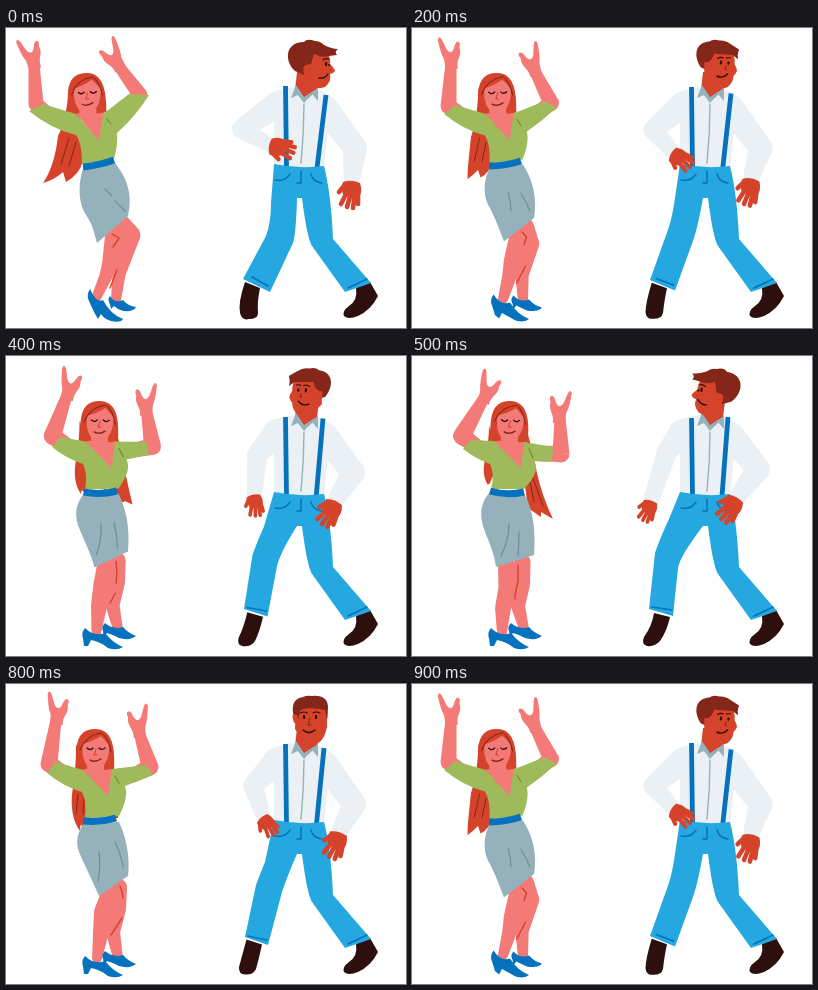
These frames come from a looping animation (400 by 300 pixels, 1 s). An HTML page:

```html
<!DOCTYPE html>
<html lang="en">
<head>
<meta charset="utf-8">
<title>Two dancers</title>
<style>
html, body { margin: 0; width: 100%; height: 100%; overflow: hidden; background: #fff; }
svg { display: block; width: 100%; height: 100%; }
</style>
</head>
<body>
<svg id="stage" viewBox="0 0 400 300"></svg>
<script>
const PINK = '#f47a78', RED = '#d5432a', MAROON = '#84261a', GREEN = '#9fba5a', OLIVE = '#738c3b',
  BLUE = '#0671bd', SKY = '#25a8e0', GREY = '#95b1bb', SLATE = '#708f9b',
  SHIRT = '#eaf0f3', DARK = '#2d0f0e';

const clamp = v => Math.min(1, Math.max(0, v));
const NUMBER = /-?\d+(\.\d+)?/g;

// Blends evenly spaced key shapes that share one structure; s runs from 0 to 1
function mix(s, ...keys) {
  const last = keys.length - 1, i = Math.min(Math.floor(s * last), last - 1), f = s * last - i;
  const next = keys[i + 1].match(NUMBER);
  let n = 0;
  return keys[i].replace(NUMBER, v => +(+v + (next[n++] - v) * f).toFixed(2));
}

const fill = (d, c) => `<path d="${d}" fill="${c}"/>`;
const line = (d, c, w = 1.4, cap = 'round') =>
  `<path d="${d}" fill="none" stroke="${c}" stroke-width="${w}" stroke-linecap="${cap}" stroke-linejoin="round"/>`;
const group = (s, tf) => `<g transform="${tf}">${s}</g>`;

// Tapered limb through joints "x,y,radius x,y,radius ..."
function limb(text, color) {
  const joints = text.split(' ').map(j => j.split(',').map(Number));
  let d = '';
  joints.forEach(([x, y, r], i) => {
    d += `M${x - r},${y}a${r},${r} 0 1 0 ${2 * r},0a${r},${r} 0 1 0 ${-2 * r},0Z`;
    if (!i) return;
    const [px, py, pr] = joints[i - 1], len = Math.hypot(x - px, y - py);
    const nx = (py - y) / len, ny = (x - px) / len;
    const at = (a, b, k) => `${(a + nx * k).toFixed(1)},${(b + ny * k).toFixed(1)}`;
    d += `M${at(px, py, pr)}L${at(x, y, r)}L${at(x, y, -r)}L${at(px, py, -pr)}Z`;
  });
  return fill(d, color);
}

const openHand = fill('M-6,5 L-7,-5 C-10,-11 -11,-19 -12,-25 Q-11,-30 -8,-25 L-4,-15 Q-1,-10 2,-13 C5,-17 4,-21 8,-22 Q11,-21 9,-16 C11,-9 7,-6 6,0 L6,5Z', PINK);

const looseHand =
  fill('M-8,-1 Q0,-4 9,0 Q12,9 8,14 L-7,13 Q-11,6 -8,-1Z', RED) +
  line('M-4,9 L-10,21 M0,10 L-4,24 M4,10 L2,25 M7,9 L7,21 M-7,3 L-12,9', RED, 4.6);

const herHead =
  fill('M-18,21 C-20,-1 -20,-21 0,-21 C18,-21 20,-2 19,19 L10,20 L-10,19Z', RED) +
  fill('M-8,12 L9,12 L9,24 L-8,24Z', PINK) +
  fill('M6,-14 C0,-10 -6,-8 -12,-6 C-14,7 -10,19 1,19 C11,18 15,5 14,-5 Q10,-10 6,-14Z', PINK) +
  line('M7,-17 Q-9,-15 -15,0 M8,-16 Q14,-10 16,2', MAROON, 1) +
  line('M-8,-2 Q-5,1 -2,-2 M4,-2 Q7,1 10,-2', DARK, 1.3) +
  line('M1,-1 L-1,5 L2,5', RED, 1) +
  line('M-5,10 Q0,13 6,9', MAROON, 1.4);

function woman(s) {
  const m = (...keys) => mix(s, ...keys);
  const hair = fill(m(
      'M63,60 C61,82 58,96 52,108 C50,126 45,144 37,155 Q48,152 57,144 L60,154 Q73,147 77,133 L74,90Z',
      'M70,60 C70,85 68,98 66,110 C65,122 66,136 74,147 Q74,143 75,140 L77,145 Q82,143 84,134 L84,90Z',
      'M77,70 C77,85 74,98 73,104 C71,112 71,122 76,129 Q76,128 77,128 L78,127 Q80,122 82,118 L84,90Z'), RED) +
    fill(m(
      'M94,75 Q96,95 96,105 Q98,115 98,125 L95,125 L94,122 L90,120 L88,100 L86,80Z',
      'M106,75 Q110,95 112,108 Q114,120 112,134 L108,134 L106,132 L102,130 L100,110 L98,80Z',
      'M115,75 Q122,100 125,117 Q130,140 141,163 L129,156 L129,161 L116,152 L111,115 L100,80Z'), RED) +
    line(m('M63,110 L55,136 M70,114 L63,138', 'M72,110 L70,130 M78,115 L77,130', 'M121,122 L131,150 M118,126 L122,146'), MAROON, 1);
  const arms =
    limb(m('28,36,5.5 30,76,7.5 42,85,6', '50,36,5.5 43,80,8.5 60,90,7', '72,42,5.5 50,80,9 66,91,7'), PINK) +
    limb(m('112,37,5.5 134,67,7.5 122,80,6', '133,48,5.5 144,83,8.5 126,92,7', '148,62,5.5 149,98,8.5 126,97,7'), PINK) +
    group(openHand, m('translate(28 36) rotate(-14)', 'translate(51 36) rotate(6)', 'translate(73 42) rotate(21)')) +
    group(openHand, m('translate(112 37) rotate(-32)', 'translate(133 48) rotate(-7)', 'translate(147 62) rotate(2)') + ' scale(-1 1)');
  const chest = m('M70,83 L97,83 L94,113Z', 'M82,83 L113,83 L109,112Z');
  const top = m(
    'M37,76 L70,86 L93,113 L97,86 L123,66 L143,67 Q130,88 111,105 Q112,117 108,131 L76,136 Q76,115 70,107 Q45,101 23,83Z',
    'M50,78 L77,86 L102,112 L106,85 L140,81 L147,91 Q132,97 119,102 Q123,113 113,132 L79,134 Q81,117 76,108 Q58,103 41,89Z',
    'M59,84 L82,85 L109,112 L112,86 L142,91 L139,106 Q130,106 122,105 Q129,115 112,133 L79,133 Q83,118 78,108 Q64,103 51,93Z');
  const legs =
    limb(m('112,195,11 125,207,9.5 113,246,6.5 110,272,5', '113,203,8 112,225,8 107,248,7 112,274,5', '110,206,8.5 110,228,8 106,250,7 112,273,5'), PINK) +
    limb(m('107,208,8 103,236,7 100,248,6.5 91,268,5', '107,208,11 98,228,10 95,248,8 91,274,5', '95,212,9 95,232,8.5 91,252,8 90,276,5'), PINK) +
    line(m('M106,206 L113,210 L107,219 M111,242 L104,260', 'M114,202 L116,208 L117,214 M116,234 L105,251', 'M106,209 L106,225 L103,240 M103,240 L103,243'), RED);
  const skirt = m(
    'M77,141 L109,135 C121,150 127,166 122,188 L91,215 C88,205 87,197 80,187 C72,175 72,155 77,141Z',
    'M78,139 L113,138 C121,155 124,175 122,192 L93,212 C88,200 78,180 73,168 C69,157 72,148 78,139Z',
    'M78,136 L112,137 C121,153 124,175 122,199 L84,211 C82,195 76,185 71,170 C67,155 70,145 78,136Z');
  const pleats = m(
    'M99,161 Q103,165 106,168 M109,173 Q114,178 119,183',
    'M93,168 Q95,182 92,197 M109,158 Q115,170 117,183',
    'M97,168 Q97,184 89,200 M107,176 Q107,188 106,200');
  const land = clamp(2 * s);
  const shoes = fill(mix(land,
      'M104,268 Q101,272 104,276 L105,281 L108,278 Q112,282 117,283 Q128,284 130,279 Q122,278 117,272 Q109,276 104,268Z',
      'M99,267 Q95,271 97,275 L98,281 L101,277 Q108,279 113,282 Q124,285 130,280 Q122,277 117,271 Q107,274 99,267Z'), BLUE) +
    fill(mix(land,
      'M84,261 Q80,267 83,273 L88,284 L92,291 L95,286 Q98,291 105,293 Q115,295 117,291 Q104,286 97,272 Q90,275 84,261Z',
      'M79,272 Q75,277 77,282 L78,290 L82,290 L85,284 Q95,286 102,292 Q111,295 117,291 Q107,287 99,277 Q88,281 79,272Z'), BLUE);

  return hair + arms + fill(chest, PINK) + line(chest + 'Z', PINK, 3) +
    group(herHead, `translate(${80.5 + 17 * s} 66) rotate(${5 * s - 3})`) +
    fill(top, GREEN) + line(m('M101,91 L105,96', 'M117,93 L121,102'), OLIVE, 1.2) +
    legs + fill(skirt, GREY) + line(pleats, SLATE, 1.3) +
    line(m('M77,139 Q94,137 108,132', 'M78,135 Q95,140 112,136'), BLUE, 7, 'butt') + shoes;
}

// Turns from profile to front, then mirrored back to profile
function hisHead(s) {
  const m = (...keys) => mix(2 * Math.min(s, 1 - s), ...keys);
  const head = fill(m(
      'M297,22 L321,22 Q325,32 324,36 Q329,41 329,43 Q327,46 324,46 Q326,53 319,59 Q311,62 304,57 L295,50Z',
      'M290,22 L320,22 Q322,32 321,36 Q321,40 321,43 Q320,47 319,50 Q317,56 311,60 Q303,62 297,56 L289,45Z'), RED) +
    fill(m(
      'M289,43 C278,33 279,14 298,14 Q301,10 309,13 Q314,13 318,17 Q326,21 332,21 Q328,24 331,27 L323,28 Q316,30 308,26 L305,36 L299,37 L298,47Z',
      'M289,36 C285,24 286,15 297,13 Q301,11 306,12 Q314,11 319,15 Q322,18 322,22 Q322,29 321,36 L319,26 Q306,23 297,25 L294,27 L293,31 L292,37Z'), MAROON) +
    line(m('M300,40 L300,44', 'M289,33 L290,37'), RED, 5) +
    line(m('M320,35 L320,37', 'M298,32 L298,34') + m('M323,37 L323,37', 'M310,32 L310,34'), DARK, 2.2) +
    line(m('M317,32 Q319,30 322,31', 'M294,29 Q298,27 301,29') + m('M322,31 Q322,31 323,31', 'M307,29 Q310,27 314,29'), DARK, 1.1) +
    line(m('M324,42 L324,42 L324,42', 'M304,34 L302,41 L305,41'), MAROON, 1) +
    line(m('M313,50 Q319,51 322,46', 'M297,46 Q303,51 309,46'), DARK);
  return s > .5 ? group(head, `rotate(${18 * s - 9} 302 45) matrix(-1 0 0 1 608 0)`) : head;
}

function man(s) {
  const m = (...keys) => mix(s, ...keys);
  const arms =
    limb(m('272,76,13 236,101,10 265,118,7', '271,76,13 247,102,10 257,131,7.5', '270,76,13 255,96,10 240,142,8'), SHIRT) +
    limb(m('319,80,13 349,120,12 346,149,8.5', '319,80,13 348,120,12 334,146,8.5', '319,79,13 346,113,12 327,139,8.5'), SHIRT);
  const straps = m('M279.500,58 L280.500,140 M320,67 L311,140', 'M279.500,62 L280.500,139 M316,61 L310,140');
  const shoe = m(
    'M239,254 Q232,274 234,285 Q236,293 243,291 Q252,291 252,285 Q251,274 254,260Z',
    'M242,257 Q240,270 232,281 Q229,288 235,290 Q243,291 248,285 Q255,275 258,261Z');
  const legs = 'M318,138 Q325,165 327,211 L365,255 L339,264 L306,218 Q301,210 296,170 L291,170 ' + m(
    'Q290,206 287,215 L264,264 L237,251 L260,208 Q265,195 265,175',
    'Q282,190 276,208 L262,261 L239,253 L250,201 Q254,190 259,178',
    'Q268,200 266,212 L261,260 L237,253 L243,197 Q248,182 257,163') + ' L268,136 Q292,141 318,138Z';

  return arms +
    fill('M270,63 Q278,60 290,59 L311,61 Q322,64 325,70 L322,100 L318,141 L268,138 L268,100Z', SHIRT) +
    line('M298,76 Q298,105 295,135', GREY) + line(straps, BLUE, 4.8, 'butt') +
    fill('M291,44 L313,44 L311,62 L298,74 L289,62Z', RED) +
    fill('M290,57 L285,70 L292,67 L298,75 L306,66 L312,73 L312,60 L298,69Z', GREY) +
    hisHead(s) + fill(shoe, DARK) +
    fill('M350,260 Q352,272 343,278 Q336,283 338,288 Q342,292 352,288 Q365,282 372,268 L364,254Z', DARK) +
    fill(legs, SKY) +
    line('M269,152 Q279,154 284,146 M295,143 L295,155 L291,155 M305,146 Q307,154 316,155', BLUE, 1.5) +
    line(m('M246,249 L262,258', 'M242,252 L261,256', 'M240,251 L260,254') + ' M342,260 L361,251', BLUE, 1.6) +
    group(looseHand, m('translate(265 119) rotate(-85) scale(0.95)', 'translate(256 135) rotate(-45) scale(0.8)', 'translate(238 146) rotate(12) scale(0.8)')) +
    group(looseHand, m('translate(345 155) rotate(0)', 'translate(332 150) rotate(12)', 'translate(323 143) rotate(25)'));
}

const stage = document.getElementById('stage');
let shown = -1;

// Sway one way and back in tenths of a second, resting at both ends
function render(ms) {
  const beat = Math.floor(ms % 1000 / 100);
  const sway = clamp((beat - 1) / 4) - clamp((beat - 6) / 4);
  if (sway !== shown) stage.innerHTML = woman(sway) + man(sway);
  shown = sway;
}

render(0);
let start;
function tick(now) {
  start ??= now;
  render(Math.max(0, now - start));
  requestAnimationFrame(tick);
}
requestAnimationFrame(tick);
</script>
</body>
</html>
```
